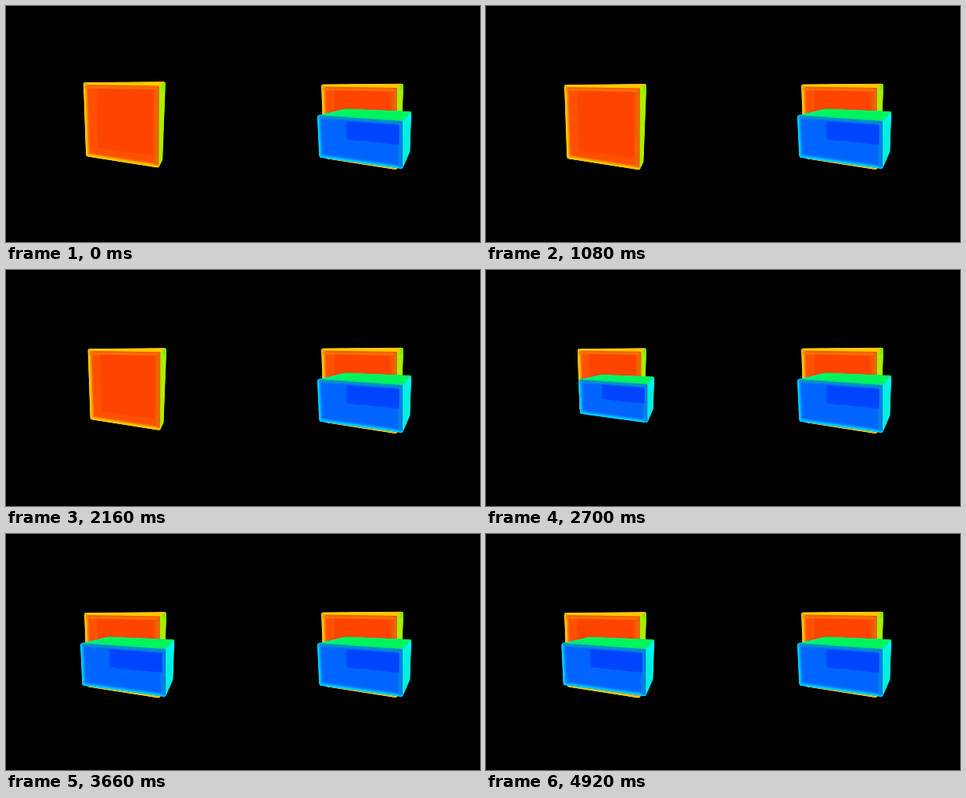
An HTML page with a canvas that plays this animation: 600 px wide and 300 px high, repeating every 4.98 s.

```html
<!DOCTYPE html>
<html>
<head>
<meta charset="utf-8">
<style>
html, body { margin: 0; width: 100%; height: 100%; overflow: hidden; background: #000; }
canvas { display: block; }
</style>
</head>
<body>
<canvas id="stage" width="600" height="300"></canvas>
<script>
const ctx = document.getElementById('stage').getContext('2d');
const LOOP = 4980, STEP = 60, GAP = 300;

// front: corners clockwise from top left; back: top left, top right, bottom right.
// wall: left, top, right, bottom of the far wall, as shares of the front face.
const red = {
  front: [[99.3, 102.5], [195, 104], [194.5, 208], [102.5, 193.5]],
  back: [[99, 99.5], [203.3, 98.6], [199.5, 198]],
  wall: [0.17, 0.05, 0.92, 0.86],
  anchor: [203, 99],
  fill: '#ff5000', deep: '#ff4400', edge: '#ff9c00', glow: '#e8d800',
  post: '#dc7000', lip: '#ee7c00',
  top: ['#ffc800', '#ffe800'], side: ['#a8f000', '#4cf000']
};
const blue = {
  front: [[94, 139], [202, 146.5], [202, 207], [96.5, 192.5]],
  back: [[130, 130.5], [213.3, 134], [211.5, 185]],
  wall: [0.34, 0.09, 0.96, 0.5],
  anchor: [213, 142],
  fill: '#0064ff', deep: '#0044ff', edge: '#0094ff', glow: '#00dcff',
  post: '#0088d8', lip: '#00a0b4',
  top: ['#00e890', '#00f45c'], side: ['#00f0e0', '#00f8ff']
};

const mix = (a, b, u) => a.map((v, i) => v + (b[i] - v) * u);
const bell = x => Math.exp(-x * x);

// Pose of the fitted red box: a settling shift, then a brief shrink.
function redPose(t) {
  const settle = Math.exp(-t / 250);
  const x = t - 2700;
  return { scale: 1 - 0.16 * bell(x / (x < 0 ? 470 : 320)), dx: -1.2 * settle, dy: 0.5 - 3 * settle };
}

// The blue box grows with a damped swing.
function bluePose(t) {
  const x = t - 2220;
  const swing = Math.cos(x / 930 * Math.PI / 2) * bell(x / 800);
  return { scale: 0.988 - 0.38 * swing, dx: 0, dy: 0 };
}

function trace(points, closed) {
  ctx.beginPath();
  points.forEach(p => ctx.lineTo(...p));
  if (closed) ctx.closePath();
}

function traceRound(points, radius) {
  const n = points.length;
  ctx.beginPath();
  ctx.moveTo(...mix(points[n - 1], points[0], 0.5));
  points.forEach((p, i) => ctx.arcTo(...p, ...points[(i + 1) % n], radius));
  ctx.closePath();
}

function fill(points, style) {
  trace(points, true);
  ctx.fillStyle = style;
  ctx.fill();
}

function line(points, style, width) {
  trace(points);
  ctx.strokeStyle = style;
  ctx.lineWidth = width;
  ctx.stroke();
}

function ramp(from, to, colors) {
  const g = ctx.createLinearGradient(...from, ...to);
  colors.forEach((c, i) => g.addColorStop(i, c));
  return g;
}

function drawBox(box, { scale, dx, dy }) {
  const [ax, ay] = box.anchor;
  const place = ([x, y]) => [ax + (x - ax) * scale + dx, ay + (y - ay) * scale + dy];
  const [tl, tr, br, bl] = box.front.map(place);
  const [farTl, farTr, farBr] = box.back.map(place);
  const onFront = (u, v) => mix(mix(tl, tr, u), mix(bl, br, u), v);
  const [l, t, r, b] = box.wall;

  ctx.save();
  traceRound([tl, farTl, farTr, farBr, br, bl], 3);
  ctx.clip();
  fill([tl, farTl, farTr, farBr, br, bl], box.glow);
  fill([tr, farTr, farBr, br], ramp(tr, farTr, box.side));
  fill([tl, farTl, farTr, tr], ramp(tl, farTl, box.top));
  fill([tl, tr, br, bl], box.fill);
  ctx.filter = 'blur(0.9px)';
  line([tl, bl, br], box.edge, 8);
  line([tl, bl, br], box.glow, 4);
  line([onFront(0.03, 0.035), onFront(0.97, 0.03)], box.lip, 3);
  line([onFront(0.97, 0.05), onFront(0.97, 0.95)], box.post, 4);
  ctx.filter = 'blur(0.4px)';
  fill([onFront(l, t), onFront(r, t), onFront(r, b), onFront(l, b)], box.deep);
  ctx.restore();
}

function draw(now) {
  const t = Math.floor((now % LOOP) / STEP) * STEP;
  ctx.fillStyle = '#000';
  ctx.fillRect(0, 0, 600, 300);
  drawBox(red, redPose(t));
  if (t >= 2220) drawBox(blue, bluePose(t));
  for (const box of [red, blue]) drawBox(box, { scale: 1, dx: 0, dy: 0, ...shift(box) });
}

// Nudges the finished pair into the right half.
function shift() {
  return { dx: GAP, dy: 0 };
}

ctx.lineJoin = ctx.lineCap = 'round';
let start;
function tick(now) {
  start ??= now;
  draw(now - start);
  requestAnimationFrame(tick);
}
draw(0);
requestAnimationFrame(tick);
</script>
</body>
</html>
```
